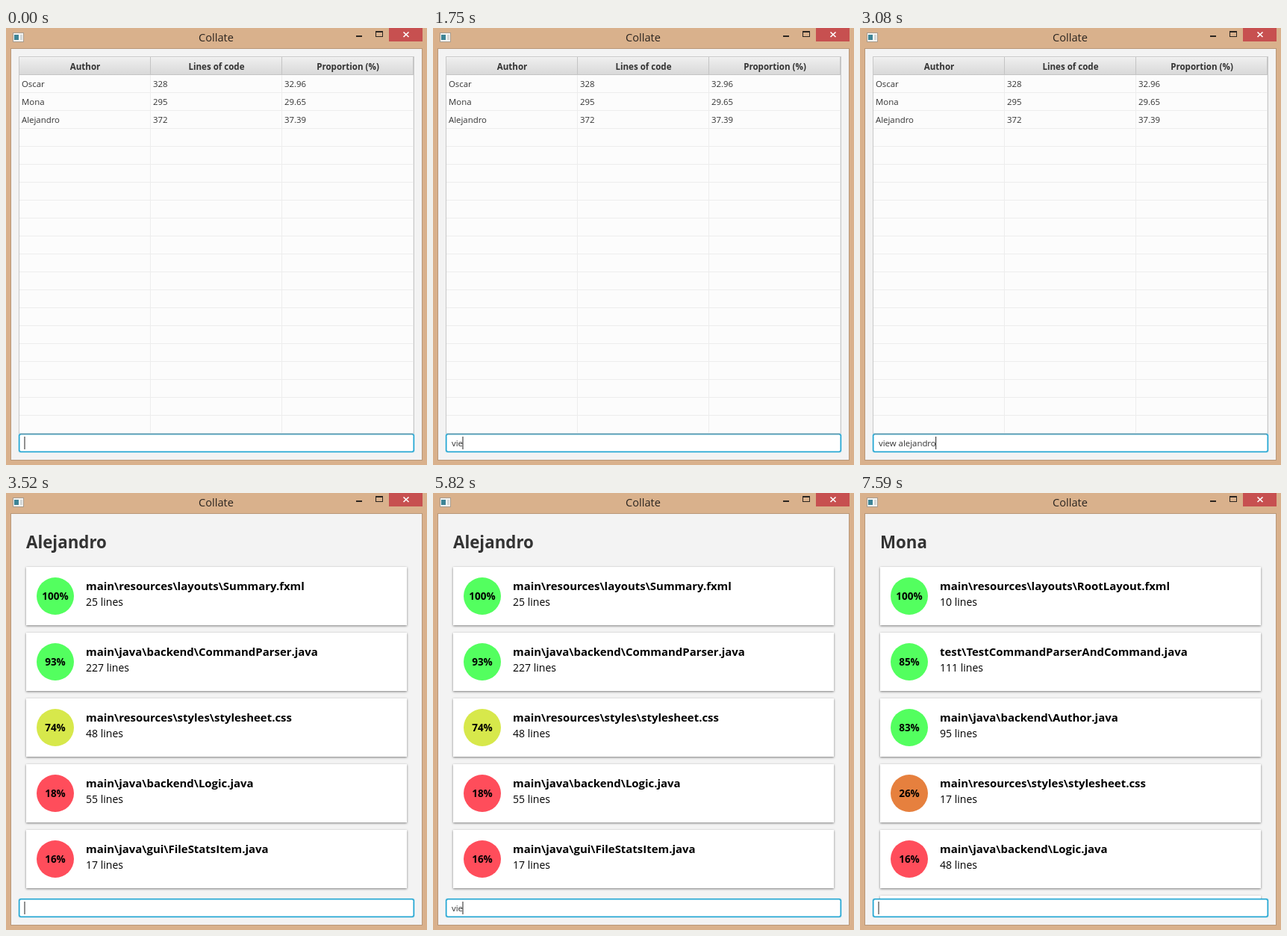
Write an HTML page that moves like this. It is 564 px wide and 585 px high and loops after 8 s.

```html
<!DOCTYPE html>
<html lang="en">
<head>
<meta charset="utf-8">
<title>Collate</title>
<style>
  html, body { margin: 0; width: 564px; height: 585px; overflow: hidden; }
  svg { display: block; font-family: "Open Sans", "Noto Sans", sans-serif; }
  text { white-space: pre; }
  .title { font-size: 14.6px; fill: #2b2520; }
  .cell { font-size: 11.4px; fill: #333; }
  .head { font-size: 11.55px; font-weight: 700; fill: #333; }
  .name { font-size: 22.3px; font-weight: 700; fill: #333; }
  .file { font-size: 14.94px; font-weight: 700; }
  .lines { font-size: 14.05px; }
  .share { font-size: 13.5px; font-weight: 700; }
  .mid { text-anchor: middle; }
  .card { fill: #fff; filter: drop-shadow(0 1px 1.5px rgba(0, 0, 0, .5)); }
</style>
</head>
<body>
<svg width="564" height="585" viewBox="0 0 564 585">
  <defs>
    <linearGradient id="header" x2="0" y2="1">
      <stop stop-color="#efefef"/><stop offset="1" stop-color="#d9d9d9"/>
    </linearGradient>
    <clipPath id="pane"><path d="M7 28H557V543H7Z"/></clipPath>
  </defs>

  <!-- window frame -->
  <rect width="564" height="585" fill="#d9b18c"/>
  <rect x="6" y="27" width="552" height="552" fill="#b99778"/>
  <rect x="7" y="28" width="550" height="550" fill="#f3f3f3"/>
  <rect x="9.5" y="6.5" width="14" height="12" fill="#f4f4f2" stroke="#a89c8e"/>
  <rect x="11" y="9" width="6" height="7" fill="#3d8496"/>
  <path d="M19 9h3v7h-3z" fill="#d4d8d8"/>
  <text class="title mid" x="281.5" y="18">Collate</text>
  <path d="M469 10h8v2h-8zM495 4h10v8h-10zM496 6v5h8v-5z" fill="#2b2520" fill-rule="evenodd"/>
  <rect x="513" width="45" height="18" fill="#c75050"/>
  <path d="M532.5 5.5l7 6.5M539.5 5.5l-7 6.5" stroke="#fff" stroke-width="1.7"/>

  <g id="screens" clip-path="url(#pane)"></g>

  <!-- command box -->
  <rect x="16" y="542" width="532" height="27" rx="4" fill="#039ed3" opacity=".15"/>
  <rect x="17" y="543" width="530" height="25" rx="3" fill="#129fcf"/>
  <rect x="18.3" y="544.3" width="527.4" height="22.4" rx="2" fill="#d9f0f8"/>
  <rect x="19.3" y="545.3" width="525.4" height="20.4" rx="1" fill="#fff"/>
  <path id="edge" d="M19 543.5H545" stroke="#777" opacity=".55"/>
  <text id="typed" class="cell" x="25" y="560"></text>
  <path id="caret" d="M0 547V564" stroke="#222"/>
</svg>
<script>
const $ = id => document.getElementById(id);
const text = (cls, x, y, s) => `<text class="${cls}" x="${x}" y="${y}">${s}</text>`;

function table(rows) {
  let s = '<path d="M17 38H547V545H17Z" fill="#c8c8c8"/><path d="M18 39H546V545H18Z" fill="#fcfcfc"/>';
  s += '<rect x="18" y="39" width="528" height="23" fill="url(#header)"/>';
  s += '<path d="M18 39.5H546" stroke="#f7f7f7"/><path d="M18 62.5H546" stroke="#c4c4c4"/>';
  for (let y = 86.5; y < 543; y += 24) s += `<path d="M18 ${y}H546" stroke="#ededed"/>`;
  for (const x of [193.5, 369.5, 545.5])
    s += `<path d="M${x} 63V543" stroke="#ededed"/><path d="M${x} 39V62" stroke="#c4c4c4"/>`;
  ['Author', 'Lines of code', 'Proportion (%)'].forEach((h, c) => {
    s += text('head mid', 106 + 176 * c, 56, h);
  });
  rows.forEach((row, r) => row.forEach((v, c) => {
    s += text('cell', 21 + 176 * c, 79 + 24 * r, v);
  }));
  return s;
}

const shade = p => p > 80 ? '#53ff5f' : p > 50 ? '#d7e84b' : p > 20 ? '#e6803e' : '#ff4d5b';

function summary(author, files, more) {
  let s = text('name', 27, 74, author);
  files.forEach(([share, file, lines], i) => {
    s += `<g transform="translate(0 ${88 * i})"><rect class="card" x="27" y="99" width="510" height="78"/>` +
      `<circle cx="66" cy="138" r="25" fill="${shade(share)}"/>` +
      text('share mid', 66, 143, share + '%') +
      text('file', 107, 130, file) + text('lines', 107, 151, lines + ' lines') + '</g>';
  });
  if (more) s += '<rect class="card" x="27" y="539" width="510" height="78"/>';
  return s;
}

const screens = [
  table([['Oscar', 328, '32.96'], ['Mona', 295, '29.65'], ['Alejandro', 372, '37.39']]),
  summary('Alejandro', [
    [100, 'main\\resources\\layouts\\Summary.fxml', 25],
    [93, 'main\\java\\backend\\CommandParser.java', 227],
    [74, 'main\\resources\\styles\\stylesheet.css', 48],
    [18, 'main\\java\\backend\\Logic.java', 55],
    [16, 'main\\java\\gui\\FileStatsItem.java', 17]]),
  summary('Mona', [
    [100, 'main\\resources\\layouts\\RootLayout.fxml', 10],
    [85, 'test\\TestCommandParserAndCommand.java', 111],
    [83, 'main\\java\\backend\\Author.java', 95],
    [26, 'main\\resources\\styles\\stylesheet.css', 17],
    [16, 'main\\java\\backend\\Logic.java', 48]], true)
];
$('screens').innerHTML = screens.map(s => `<g>${s}</g>`).join('');

// key press times for each command, and when the caret is hidden
const LOOP = 8000, ENTER = [3520, 7590];
const commands = [
  ['view alejandro', [1540, 1600, 1750, 1820, 1990, 2150, 2390, 2510, 2660, 2740, 2830, 2910, 3000, 3080]],
  ['view mona', [5610, 5710, 5820, 5930, 6090, 6610, 6820, 6970, 7030]],
  ['', []]
];
const blinks = [[210, 750], [1250, 1540], [3980, 4490], [4980, 5460]];

const start = performance.now();
function draw() {
  const t = (performance.now() - start) % LOOP;
  const step = ENTER.filter(e => t >= e).length;
  [...$('screens').children].forEach((g, i) => g.style.display = i === step ? '' : 'none');
  $('edge').style.display = step ? 'none' : '';

  const [line, keys] = commands[step];
  const typed = $('typed');
  typed.textContent = line.slice(0, keys.filter(k => t >= k).length);
  const x = 25 + (typed.textContent ? typed.getComputedTextLength() : 0);
  $('caret').setAttribute('transform', `translate(${x} 0)`);
  $('caret').style.display = blinks.some(([a, b]) => t >= a && t < b) ? 'none' : '';
  requestAnimationFrame(draw);
}
draw();
</script>
</body>
</html>
```
